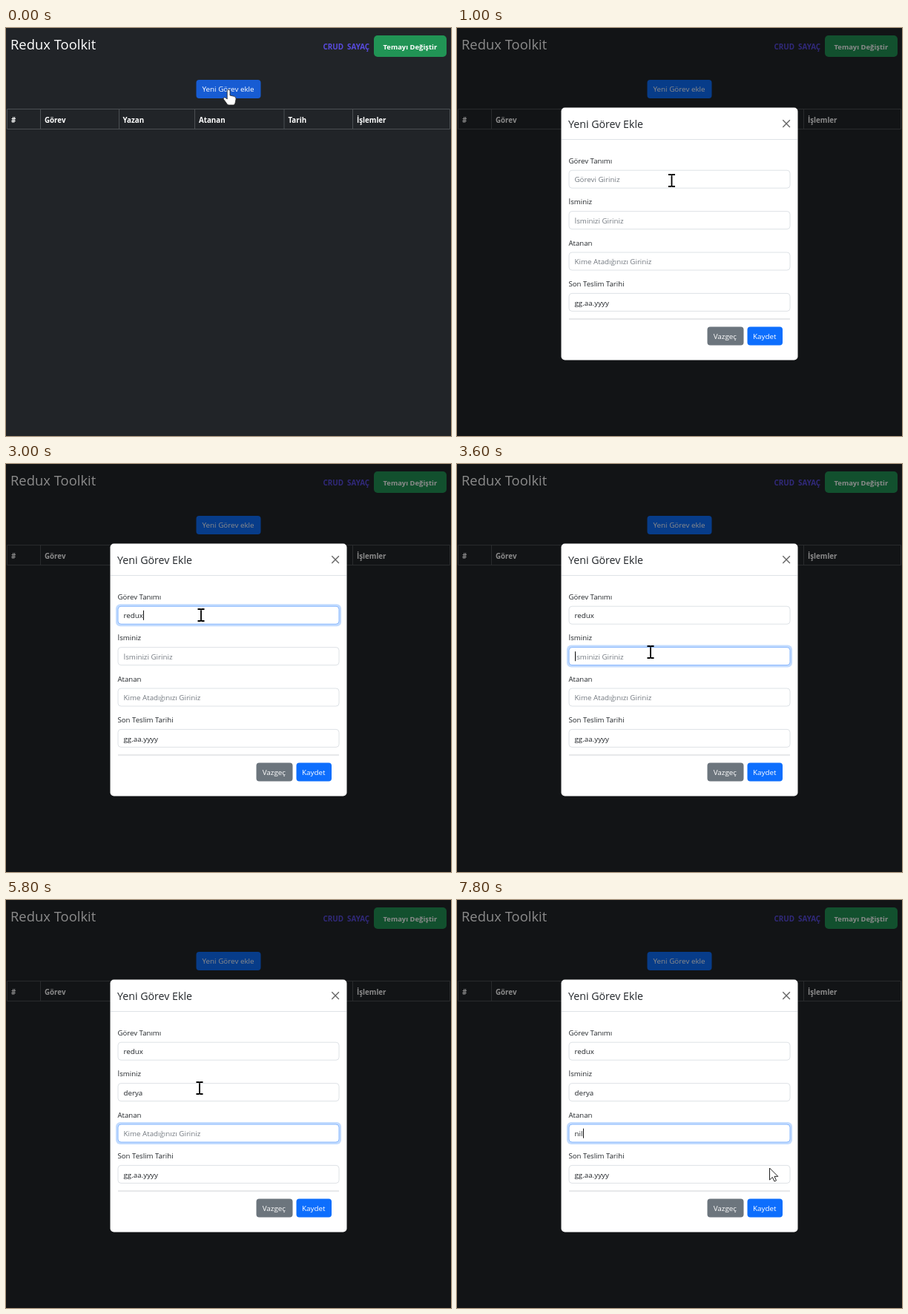
An HTML page that plays this animation: 600x551 px, repeating every 8 s.

```html
<!DOCTYPE html>
<html lang="tr">
<head>
<meta charset="utf-8">
<title>Redux Toolkit</title>
<style>
  html, body { margin: 0; width: 100%; height: 100%; overflow: hidden; background: #212428; }
  svg { display: block; width: 100vw; height: 100vh; }
  text { font-family: "Open Sans", "Noto Sans", sans-serif; font-size: 9.75px; fill: #212529; }
  .light { fill: #fff; }
  .bold { font-weight: 700; }
  .button { font-size: 9.85px; fill: #fff; }
  .label { font-size: 9.65px; }
  .link { font-size: 9.9px; font-weight: 700; fill: #594be0; }
  .grid { fill: none; stroke: #4b4f53; }
  .placeholder { fill: #747a81; }
  .box { fill: #fff; stroke: #dee2e6; }
  .focused .box { stroke: #86b7fe; }
  .ring { fill: #c2dbfe; visibility: hidden; }
  .focused .ring { visibility: visible; }
</style>
</head>
<body>
<svg viewBox="0 0 600 551">
  <rect width="600" height="551" fill="#212428"/>
  <text class="light" x="6" y="29" style="font-size:18.4px;font-weight:500">Redux Toolkit</text>
  <text class="link" x="427.5" y="29">CRUD</text>
  <text class="link" x="460" y="29">SAYAÇ</text>
  <rect x="496" y="10" width="98" height="29" rx="5" fill="#219455"/>
  <text class="light bold" x="508.5" y="29" style="font-size:9.45px">Temayı Değiştir</text>
  <rect id="add" x="256.5" y="70" width="87" height="25" rx="4"/>
  <text class="button" x="264.5" y="86.3">Yeni Görev ekle</text>
  <g id="table"><path class="grid" d="M1.5 109.5H598.5V136.5H1.5ZM46.5 110v26M152.5 110v26M254.5 110v26M375 110v26M467.5 110v26"/></g>

  <g id="modal">
    <rect width="600" height="551" opacity=".46"/>
    <rect x="140.5" y="107.5" width="319" height="341" rx="5" fill="#fff"/>
    <text x="150" y="135" style="font-size:14.2px;font-weight:500">Yeni Görev Ekle</text>
    <path d="M439.3 124.3l9.6 9.6m0-9.6l-9.6 9.6" stroke="#666" stroke-width="1.4"/>
    <path d="M141 150.5H459" stroke="#dee2e6"/>
    <g id="fields"></g>
    <path d="M151 393H449" stroke="#d0d2d5"/>
    <rect x="337.5" y="403.5" width="49" height="25" rx="4" fill="#6c757d"/>
    <text class="button" x="345.7" y="420" font-weight="500">Vazgeç</text>
    <rect x="391.5" y="403.5" width="47.5" height="25" rx="4" fill="#0d6efd"/>
    <text class="button" x="399" y="420" font-weight="500">Kaydet</text>
    <path id="caret" stroke="#111" d="M0 -6.5V6.5"/>
  </g>

  <g id="hand">
    <path d="M-1.8 2a1.9 1.9 0 0 1 3.8 0V8l5.5 1.3q3 .8 2.6 3.7l-1 5q-.5 3-2.5 3H.5q-1.5 0-2.5-1.5l-4.6-6.3q-1-1.8.7-2.4 1.5-.3 4.1 2.2z"
          fill="#fff" stroke="#222" stroke-width=".8"/>
  </g>
  <g id="arrow">
    <path d="M0 0V16L3.8 12.4 6.5 18 9 16.8 6.5 11.3H11.3Z" fill="#fff" stroke="#222" stroke-width="1" stroke-linejoin="round"/>
  </g>
  <g id="beam">
    <path d="M-4.5 -8H-1.2L0 -7.2 1.2 -8H4.5M-4.5 8H-1.2L0 7.2 1.2 8H4.5M0 -7.5V7.5" fill="none" stroke="#000" stroke-width="1.8"/>
  </g>
</svg>
<script>
const LOOP = 8000, STEP = 200;
const byId = id => document.getElementById(id);

function add(parent, tag, attributes, text = "") {
  const node = document.createElementNS("http://www.w3.org/2000/svg", tag);
  for (const name in attributes) node.setAttribute(name, attributes[name]);
  node.textContent = text;
  return parent.appendChild(node);
}

[[7, "#"], [52, "Görev"], [157.5, "Yazan"], [260, "Atanan"], [380.5, "Tarih"], [473, "İşlemler"]]
  .forEach(([x, title]) => add(byId("table"), "text", { x, y: 127.5, class: "light bold" }, title));

// typed: when each further character count is reached
const fields = [
  { label: "Görev Tanımı", hint: "Görevi Giriniz", value: "redux",
    typed: [[0, 0], [1600, 1], [1800, 2], [2000, 3], [2200, 4], [2400, 5]] },
  { label: "İsminiz", hint: "İsminizi Giriniz", value: "derya",
    typed: [[0, 0], [4000, 1], [4200, 2], [4400, 4], [4600, 5]] },
  { label: "Atanan", hint: "Kime Atadığınızı Giriniz", value: "nil",
    typed: [[0, 0], [6000, 1], [6200, 2], [6400, 3]] },
  { label: "Son Teslim Tarihi", hint: "gg.aa.yyyy", value: "", typed: [[0, 0]] }
];

fields.forEach((field, i) => {
  const y = 192 + 55.4 * i;
  field.middle = y + 12.3;
  field.group = add(byId("fields"), "g", {});
  add(field.group, "text", { x: 150.5, y: y - 9, class: "label" }, field.label);
  add(field.group, "rect", { x: 148, y: y - 2.8, width: 304, height: 30, rx: 6, class: "ring" });
  add(field.group, "rect", { x: 151, y: y + 0.2, width: 298, height: 24, rx: 4, class: "box" });
  field.text = add(field.group, "text", { x: 158.5, y: y + 16.3 });
});

const focus = [[0, -1], [1400, 0], [3600, 1], [5000, 2]];
const caretOn = [[0, 1], [5200, 0], [6000, 1], [7200, 0], [7600, 1]];
const pointer = [
  [0, ["hand", 300, 83]],
  [1000, ["beam", 289.5, 206]],
  [1200, ["beam", 284, 205]],
  [1600, ["arrow", 264, 180]],
  [2800, ["arrow", 266, 160]],
  [3000, ["beam", 263, 204]],
  [3200, ["arrow", 261, 230]],
  [3400, ["beam", 261, 254]],
  [7200, ["beam", 325, 312]],
  [7400, ["arrow", 408, 384]],
  [7600, ["hand", 430, 400]],
  [7800, ["arrow", 421.5, 362]]
];

const valueAt = (track, time) => track.findLast(([start]) => start <= time)[1];
const show = (node, visible) => { node.style.display = visible ? "" : "none"; };
const place = (node, x, y) => node.setAttribute("transform", `translate(${x} ${y})`);

function draw(time) {
  const open = time >= 1000, active = valueAt(focus, time);
  show(byId("modal"), open);
  byId("add").setAttribute("fill", open ? "#0d6efd" : "#175cd3");

  fields.forEach((field, i) => {
    const entered = field.value.slice(0, valueAt(field.typed, time));
    field.text.textContent = entered || field.hint;
    field.text.setAttribute("class", entered || !field.value ? "" : "placeholder");
    field.group.setAttribute("class", i === active ? "focused" : "");
    if (i === active) {
      const width = entered ? field.text.getComputedTextLength() : 0;
      place(byId("caret"), Math.round(159 + width) + 0.5, field.middle);
    }
  });
  show(byId("caret"), active >= 0 && valueAt(caretOn, time));

  const [shape, x, y] = valueAt(pointer, time);
  for (const name of ["hand", "arrow", "beam"]) show(byId(name), name === shape);
  place(byId(shape), x, y);
}

const started = performance.now();
function tick() {
  const time = (performance.now() - started) % LOOP;
  draw(Math.floor(time / STEP) * STEP);
  requestAnimationFrame(tick);
}
tick();
</script>
</body>
</html>
```
